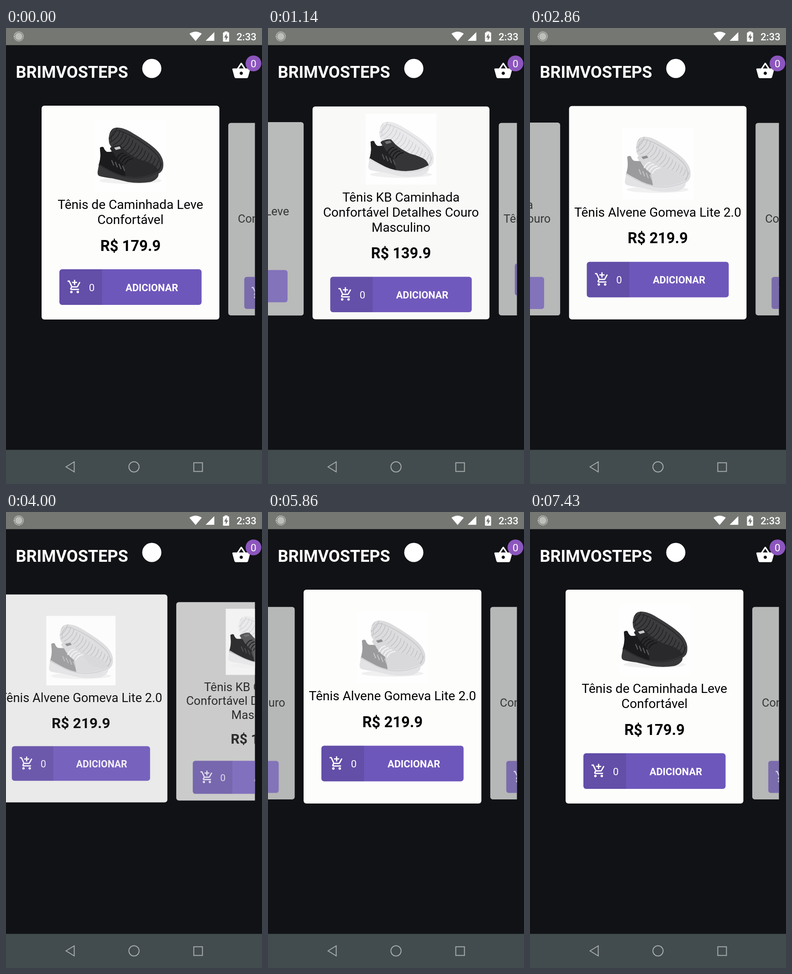
Recreate the animation shown at these times as an HTML page with a canvas. Size 561 by 998 pixels, loop 8000 ms.

```html
<!DOCTYPE html>
<html lang="pt-BR">
<head>
<meta charset="utf-8">
<title>Loja de tênis</title>
<style>
html, body { margin: 0; width: 100%; height: 100%; overflow: hidden; background: #111215; }
canvas { display: block; width: 561px; height: 998px; }
</style>
</head>
<body>
<canvas id="stage" width="561" height="998"></canvas>
<script>
const ctx = document.getElementById('stage').getContext('2d');
const LOOP = 8000, FPS = 7;
const CARD = { w: 389.6, h: 468, x: 272.8, y: 404, drop: 14.3 };
const LINE = 32.8;

const CART = new Path2D('M11 9h2V6h3V4h-3V1h-2v3H8v2h3v3zm-4 9c-1.1 0-1.99.9-1.99 2S5.9 22 7 22s2-.9 2-2-.9-2-2-2zm10 0c-1.1 0-1.99.9-1.99 2s.89 2 1.99 2 2-.9 2-2-.9-2-2-2zm-9.83-3.25l.03-.12.9-1.63h7.45c.75 0 1.41-.41 1.75-1.03l3.86-7.01L19.42 4h-.01l-1.1 2-2.76 5H8.53l-.13-.27L6.16 6l-.95-2-.94-2H1v2h2l3.6 7.59-1.35 2.45c-.16.28-.25.61-.25.96 0 1.1.9 2 2 2h12v-2H7.42c-.13 0-.25-.11-.25-.25z');
const BASKET = new Path2D('M17.21 9l-4.38-6.56c-.19-.28-.51-.42-.83-.42-.32 0-.64.14-.83.43L6.79 9H2c-.55 0-1 .45-1 1 0 .09.01.18.04.27l2.54 9.27c.23.84 1 1.46 1.92 1.46h13c.92 0 1.69-.62 1.93-1.46l2.54-9.27L23 10c0-.55-.45-1-1-1h-4.79zM9 9l3-4.4L15 9H9zm3 8c-1.1 0-2-.9-2-2s.9-2 2-2 2 .9 2 2-.9 2-2 2z');
const SHOE = {
  back: new Path2D('M31 48C29 36 32 24 40 18C50 13 66 18 78 25C96 36 118 49 132 62C144 73 151 86 150 98C150 108 146 114 136 119L100 108L60 60L40 62C36 58 32 54 31 48Z'),
  upper: new Path2D('M11 60Q15 57 19 59Q21 66 26 69Q32 70 37 68L33 62Q34 58 40 57Q49 53 56 55Q60 59 66 66Q80 78 98 86Q118 91 129 98Q138 104 139 114L120 128L70 124L30 108L8 98Q13 84 12 72Z'),
  heel: new Path2D('M11 60Q15 57 19 59Q21 66 26 69L40 70Q46 84 62 96L68 125L30 110L8 100Q13 84 12 72Z'),
  sole: new Path2D('M9 96Q22 104 34 110Q54 122 78 124Q110 127 138 112Q141 118 138 124Q132 132 122 135Q96 139 72 135Q52 130 38 127Q20 125 10 122Q5 120 6 112Z'),
  tag: new Path2D('M42 60L54 57L57 62L46 65Z')
};

const black = { back: '#3c3c3e', ridge: '#242426', upper: '#29292b', heel: '#1b1b1d', sole: '#38383a', lace: '#151517', strap: '#5a5a5c', tag: '#c9c9c9' };
const mixed = { back: '#e9e9eb', ridge: '#d2d2d5', upper: '#323235', heel: '#222224', sole: '#e6e6e8', lace: '#161618', strap: '#5a5a5d', tag: '#77777a' };
const white = { back: '#dcdcde', ridge: '#c3c3c6', upper: '#d9d9dc', heel: '#9b9b9d', sole: '#e3e3e5', lace: '#f6f6f7', strap: '#c4c4c6', tag: '#8d8d90' };

const leather = { title: ['Tênis KB Caminhada', 'Confortável Detalhes Couro', 'Masculino'], price: '139.9', shoe: mixed, dy: 2 };
const lite = { title: ['Tênis Alvene Gomeva Lite 2.0'], price: '219.9', shoe: white, dy: 3 };
const walk = { title: ['Tênis de Caminhada Leve', 'Confortável'], price: '179.9', shoe: black, dy: 0 };
const items = [walk, leather, lite, leather, lite];

// Swipes: first tick, number of ticks, start and end card, curve of the ease.
const swipes = [
  { at: 6, n: 4, from: 0, to: 1 },
  { at: 15, n: 8, from: 1, to: 2, a: 1.466, b: 3.169 },
  { at: 27, n: 6, from: 2, to: 3 },
  { at: 38, n: 4, from: 3, to: 2 },
  { at: 42, n: 3, from: 2, to: 1 },
  { at: 50, n: 3, from: 1, to: 0 }
];

function ease(u, a = 1.8, b = 2.53) {
  const p = u ** a, q = (1 - u) ** b;
  return p / (p + q);
}

function scrollAt(tick) {
  let pos = 0;
  for (const s of swipes) {
    if (tick < s.at) break;
    const u = Math.min(1, (tick - s.at + 1) / s.n);
    pos = s.from + (s.to - s.from) * ease(u, s.a, s.b);
  }
  return pos;
}

function box(x, y, w, h, color, radius = 0) {
  ctx.fillStyle = color;
  ctx.beginPath();
  ctx.roundRect(x, y, w, h, radius);
  ctx.fill();
}

function disc(x, y, r, color) {
  ctx.fillStyle = color;
  ctx.beginPath();
  ctx.arc(x, y, r, 0, Math.PI * 2);
  ctx.fill();
}

function fill(path, color) {
  ctx.fillStyle = color;
  ctx.fill(path);
}

function line(path, color, width) {
  ctx.strokeStyle = color;
  ctx.lineWidth = width;
  ctx.stroke(new Path2D(path));
}

function text(str, x, y, size, color, weight = 400, align = 'center') {
  ctx.font = `${weight} ${size}px Roboto, sans-serif`;
  ctx.textAlign = align;
  ctx.fillStyle = color;
  ctx.fillText(str, x, y);
}

function icon(path, x, y, scale, color) {
  ctx.save();
  ctx.translate(x, y);
  ctx.scale(scale, scale);
  fill(path, color);
  ctx.restore();
}

function drawShoe(c) {
  ctx.save();
  ctx.lineCap = 'round';
  ctx.fillStyle = '#f0f0f0';
  ctx.beginPath();
  ctx.ellipse(78, 132, 68, 7, 0, 0, Math.PI * 2);
  ctx.fill();

  fill(SHOE.back, c.back);
  ctx.save();
  ctx.clip(SHOE.back);
  for (let i = 0; i < 17; i++) {
    const x = 34 + i * 7, y = 6 + i * 5.5;
    line(`M${x} ${y}q-3 16 -22 26`, c.ridge, 1.8);
  }
  line('M36 45C34 30 42 20 54 23C84 33 120 58 136 76C146 90 146 104 138 112', c.ridge, 1.5);
  ctx.restore();

  fill(SHOE.upper, c.upper);
  fill(SHOE.heel, c.heel);
  fill(SHOE.sole, c.sole);
  line('M9 98Q22 106 34 112Q54 123 78 126Q110 129 138 115', c.ridge, 1);
  fill(SHOE.tag, c.tag);
  for (let i = 0; i < 4; i++) {
    line(`M${37 + i * 8} ${88 + i * 4}l4 10`, c.strap, 2.2);
    line(`M${48 + i * 6} ${84 + i * 4}q5 -11 ${14 + i} -12`, c.lace, 2.2);
  }
  ctx.restore();
}

function drawCard(item, offset) {
  const far = Math.min(1, Math.abs(offset));
  const scale = 1 - 0.1 * far;
  const grow = (item.title.length - 2) * LINE / 2;
  ctx.save();
  ctx.translate(CARD.x + offset * CARD.w, CARD.y + CARD.drop * far);
  ctx.scale(scale, scale);
  // Every part fades on its own, so the photo stays brighter than its card.
  ctx.globalAlpha = 1 - 0.3 * far;
  box(-CARD.w / 2, -CARD.h / 2, CARD.w, CARD.h, '#fdfefc', 6);

  ctx.save();
  ctx.translate(-78, -202 - grow);
  box(0, 0, 156, 156, '#fefefe');
  ctx.translate(0, item.dy);
  drawShoe(item.shoe);
  ctx.restore();

  item.title.forEach((str, i) => text(str, 0, -8 - grow + i * LINE, 28.05, '#000'));
  text('R$ ' + item.price, 0, 83.5 + grow, 32.7, '#000', 700);

  ctx.translate(-155.8, 124 + grow);
  box(0, 0, 311.6, 77.9, '#6e57bb', 6);
  box(0, 0, 93.5, 77.9, 'rgba(0,0,0,.1)', [6, 0, 0, 6]);
  icon(CART, 16.5, 21.8, 1.4, '#fff');
  text('0', 71, 47.5, 22.3, '#fff');
  text('ADICIONAR', 202.5, 47.5, 21.8, '#fff', 700);
  ctx.restore();
}

function drawStatus() {
  box(0, 0, 561, 37.5, '#757773');
  disc(28, 18.5, 8, '#bdbfbb');
  ctx.setLineDash([2, 1.2]);
  line('M18 18.5a10 10 0 1 0 20 0a10 10 0 1 0 -20 0', '#d0d2ce', 2);
  ctx.setLineDash([]);
  fill(new Path2D('M415.5 28.5L402 12.5Q415.5 3.5 429 12.5Z'), '#fff');
  fill(new Path2D('M456.5 9V28H437.5Z'), '#fff');
  box(479, 7.5, 6.5, 4, '#fff');
  box(475.5, 9.5, 13.5, 20.5, '#fff', 1.5);
  fill(new Path2D('M483.5 12L478 21H481.5V27.5L487 18.5H483.5Z'), '#757773');
  text('2:33', 527, 27, 22, '#fff', 500);
}

function drawHeader() {
  text('BRIMVOSTEPS', 21.5, 108.5, 36, '#fff', 700, 'left');
  disc(319.5, 88.5, 21, '#fff');
  icon(BASKET, 494.2, 72.4, 1.78, '#fff');
  disc(542.3, 77.5, 17.3, '#8c56be');
  text('0', 542.3, 85.5, 22.5, '#fff');
}

function drawNav() {
  box(0, 923.2, 561, 74.8, '#424b4d');
  const ink = '#a6abab';
  line('M131.5 960.5L149.5 949.5V971.5Z', ink, 2);
  line('M269.3 960.5a11.2 11.2 0 1 0 22.4 0a11.2 11.2 0 1 0 -22.4 0', ink, 2);
  line('M411.5 951.5h19v19h-19z', ink, 2);
}

function draw(ms) {
  const pos = scrollAt(Math.floor((ms + 5) * FPS / 1000));
  box(0, 0, 561, 998, '#111215');
  ctx.save();
  ctx.beginPath();
  ctx.rect(0, 138, 545.5, 780);
  ctx.clip();
  items.forEach((item, i) => {
    if (Math.abs(i - pos) < 2) drawCard(item, i - pos);
  });
  ctx.restore();
  drawStatus();
  drawHeader();
  drawNav();
}

const start = performance.now();
function loop() {
  draw((performance.now() - start) % LOOP);
  requestAnimationFrame(loop);
}
loop();
</script>
</body>
</html>
```
